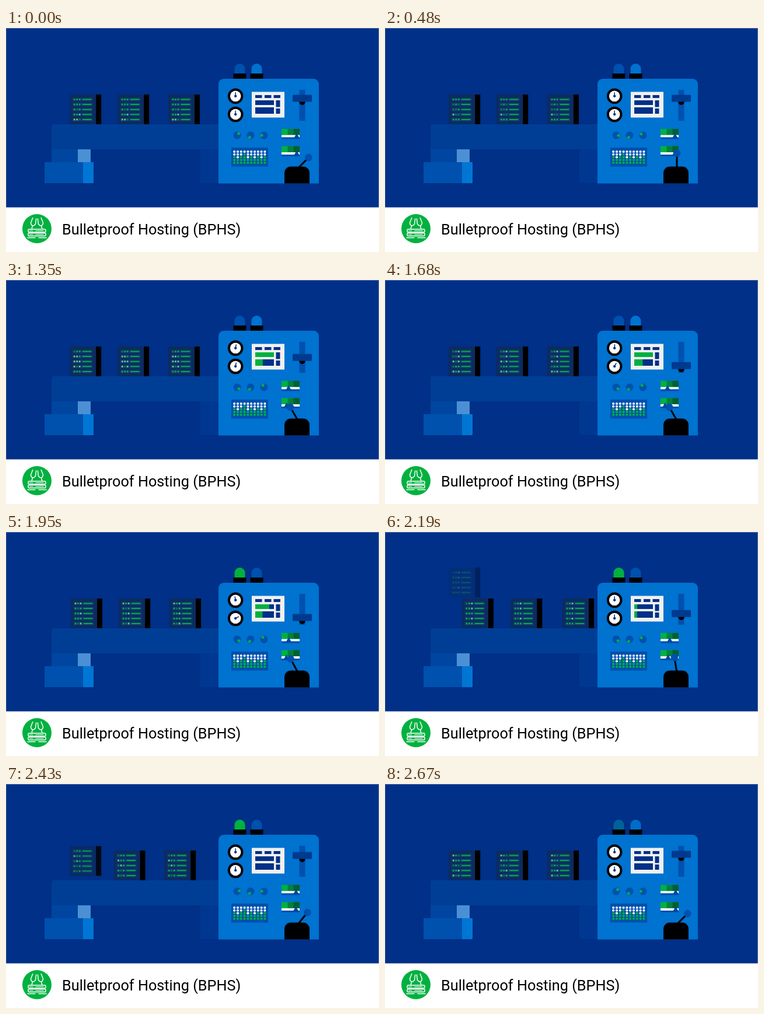
Recreate the animation shown at these times as an HTML page with a canvas. Size 639x384 px, loop 2700 ms.

```html
<!DOCTYPE html>
<html lang="en">
<head>
<meta charset="utf-8">
<title>Bulletproof Hosting (BPHS)</title>
<style>
html, body { margin: 0; width: 100%; height: 100%; overflow: hidden; background: #fff; }
canvas { display: block; width: 639px; height: 384px; }
</style>
</head>
<body>
<canvas id="stage" width="639" height="384"></canvas>
<script>
const ctx = document.getElementById('stage').getContext('2d');
const LOOP = 2700;
const NAVY = '#003087', MID = '#0050ae', BLUE = '#0072d0', GREEN = '#00b140';
const TITLE = 'Bulletproof Hosting (BPHS)';

const clamp = v => Math.max(0, Math.min(1, v));
const mix = (a, b, p) => a + (b - a) * p;
const smooth = (t, from, to) => {
  const u = clamp((t - from) / (to - from));
  return u * u * (3 - 2 * u);
};

// Steep ease in and out: cubic-bezier(.775, 0, .25, 1)
function glide(t, from, to) {
  const x = clamp((t - from) / (to - from));
  let lo = 0, hi = 1;
  for (let i = 0; i < 20; i++) {
    const s = (lo + hi) / 2, r = 1 - s;
    if (2.325 * s * r * r + 0.75 * s * s * r + s * s * s < x) lo = s; else hi = s;
  }
  return lo * lo * (3 - 2 * lo);
}

function mixColor(a, b, p) {
  return `rgb(${a.map((v, i) => Math.round(mix(v, b[i], p))).join()})`;
}

function rect(x, y, w, h, color, radius = 0) {
  ctx.fillStyle = color;
  ctx.beginPath();
  ctx.roundRect(x, y, w, h, radius);
  ctx.fill();
}

function disc(x, y, r, color) {
  ctx.fillStyle = color;
  ctx.beginPath();
  ctx.arc(x, y, r, 0, Math.PI * 2);
  ctx.fill();
}

function line(points, color, width) {
  ctx.strokeStyle = color;
  ctx.lineWidth = width;
  ctx.lineCap = ctx.lineJoin = 'round';
  ctx.beginPath();
  points.forEach(([x, y]) => ctx.lineTo(x, y));
  ctx.stroke();
}

function server(x, y, t, alpha = 1) {
  const tick = Math.floor(t / 150);
  ctx.save();
  ctx.globalAlpha = alpha;
  ctx.translate(x, y);
  rect(0, 0, 45, 51, '#0c2b60');
  rect(45, 0, 9, 51, '#000');
  for (let row = 0; row < 5; row++) {
    const cy = 8.5 + row * 8.6;
    rect(4.5, cy - 3, 35, 6, '#10386f');
    for (let dot = 0; dot < 3; dot++) {
      const noise = Math.sin((row * 3 + dot + 1) * 12.9 + tick * 4.7) * 437.5;
      const level = noise - Math.floor(noise);
      disc(8 + dot * 4.5, cy, 1.6, level < 0.25 ? '#0b7850' : level > 0.8 ? '#62c98a' : GREEN);
    }
    rect(21.5, cy - 1, 16, 2, GREEN, 1);
  }
  ctx.restore();
}

function conveyor(t, back) {
  rect(333, 207, 32, 59, '#003791');
  rect(78, 165, 287, 43, '#003e96', [4, 0, 0, 0]);
  rect(78, 208, 45, 22, '#00459f');
  rect(123, 208, 22, 22, '#4b90d4');
  rect(66, 230, 66, 36, MID);
  rect(132, 230, 18, 36, '#0076d4');

  [[109.2, 82], [191.2, 87], [278, 94]].forEach(([x, travel]) => server(x + travel * back, 114, t));
  if (t > 2048) server(109.2, mix(47, 114, smooth(t, 2048, 2531)), t, clamp((t - 2048) / 460));
}

function lamp(x, color) {
  rect(x - 9, 61, 18, 20, color, [9, 9, 0, 0]);
  rect(x - 11, 78, 22, 9, '#000');
}

function gauge(y, degrees) {
  disc(393.2, y, 13.3, '#000');
  disc(393.2, y, 9.3, '#fff');
  const a = degrees * Math.PI / 180;
  line([[393.2, y], [393.2 + 6 * Math.sin(a), y - 6 * Math.cos(a)]], NAVY, 1.5);
  disc(393.2, y, 2.2, NAVY);
}

function screen(t) {
  rect(421, 109.5, 56, 44, '#f0f0ef');
  [427, 443, 458.5].forEach(x => rect(x, 115, 11.5, 5, NAVY));
  rect(427, 124, 32, 8, NAVY);
  rect(427, 136, 32, 11, NAVY);
  rect(462.5, 124, 7, 11.5, NAVY);
  rect(462.5, 138, 7, 9, NAVY);
  const upper = smooth(t, 444, 1014) * (1 - smooth(t, 1763, 2336));
  const lower = 0.45 * smooth(t, 950, 1450) * (1 - smooth(t, 1800, 2430));
  rect(427, 124, 32 * upper, 8, GREEN);
  rect(427, 136, 32 * lower, 11, GREEN);
}

function slider(t, back) {
  const y = mix(120.5, 147, glide(t, 900, 1800) - back);
  rect(502.5, 106, 10, 53, MID);
  disc(507.5, y + 6, 5.3, '#000');
  rect(491, y - 6, 33, 12, '#003a8f', 1.5);
}

function knob(x, degrees) {
  const a = degrees * Math.PI / 180;
  disc(x, 184, 6.5, MID);
  disc(x + 3.9 * Math.cos(a), 184 + 3.9 * Math.sin(a), 2.5, GREEN);
}

function meter(y, x) {
  rect(472, y, 31, 10.5, GREEN);
  rect(482.5, y, 20.5, 10.5, '#00813c');
  rect(492.5, y, 10.5, 10.5, '#006130');
  rect(472, y + 10.5, 31, 4, '#fff');
  rect(472, y + 14.5, 31, 3, MID);
  ctx.save();
  ctx.beginPath();
  ctx.rect(472, y, 31, 17.5);
  ctx.clip();
  ctx.fillStyle = '#00479f';
  ctx.beginPath();
  ctx.moveTo(x, y + 7.5);
  ctx.lineTo(x + 5, y + 16);
  ctx.lineTo(x - 5, y + 16);
  ctx.fill();
  ctx.restore();
}

function dotPanel() {
  rect(386, 205, 63, 32.5, MID);
  [2, 3, 2, 1, 3, 2, 3, 2, 3, 2].forEach((white, col) => {
    for (let row = 0; row < 5; row++) {
      disc(391.2 + col * 5.8, 212 + row * 4.75, 2.1, row < white ? '#fff' : GREEN);
    }
  });
}

function lever(pull) {
  const a = mix(45, -30, pull) * Math.PI / 180;
  const x = 500 + 26 * Math.sin(a), y = 240.5 - 26 * Math.cos(a);
  line([[500, 240.5], [x, y]], '#000', 3);
  disc(x, y, 6.3, MID);
  rect(477, 237.5, 43, 29, '#000', [11, 11, 0, 0]);
}

function machine(t, back) {
  const pull = glide(t, 0, 900) - back;
  const alarm = smooth(t, 1770, 1880) * (1 - smooth(t, 2590, 2700));
  lamp(400.5, mixColor([0, 80, 174], [0, 177, 64], alarm));
  lamp(429.5, mixColor([0, 114, 208], [0, 80, 174], alarm));
  rect(364, 87, 172, 179.5, BLUE, [9, 9, 0, 0]);

  const settle = smooth(t, 1950, 2190);
  const nudge = smooth(t, 850, 1350), swing = smooth(t, 1500, 1950);
  gauge(116.8, (10 * nudge - 20 * swing) * (1 - settle));
  gauge(148, (10 * nudge + 52 * swing) * (1 - settle));
  screen(t);
  slider(t, back);

  knob(396, mix(-50, 40, glide(t, 0, 900) - smooth(t, 2150, 2670)));
  knob(419, 115);
  knob(442, mix(180, 242, pull));
  meter(173, mix(498, 484, smooth(t, 300, 1350) - back));
  meter(202.5, mix(498, 480, smooth(t, 300, 1500) - back));
  dotPanel();
  lever(pull);
}

function glass(x, tilt) {
  ctx.save();
  ctx.translate(x, 335);
  ctx.rotate(tilt);
  line([[-3, -9], [-4.2, 0], [-2.5, 3], [0, 4], [2.5, 3], [4.2, 0], [3, -9]], '#fff', 1.5);
  line([[0, 4], [0, 9]], '#fff', 1.5);
  ctx.restore();
}

function caption() {
  rect(0, 307.5, 639, 77, '#fff');
  disc(53, 344, 25, GREEN);
  glass(46.5, 0.25);
  glass(59.5, -0.25);
  [345, 351.5].forEach(y => {
    ctx.strokeStyle = '#fff';
    ctx.lineWidth = 1.5;
    ctx.beginPath();
    ctx.roundRect(38, y, 30, 5, 1.5);
    ctx.stroke();
    [41.5, 44.5].forEach(x => disc(x, y + 2.5, 0.9, '#fff'));
    line([[51, y + 2.5], [64, y + 2.5]], '#fff', 1.2);
  });
  line([[37, 359.5], [50, 359.5]], '#fff', 1.5);
  line([[56, 359.5], [69, 359.5]], '#fff', 1.5);

  setFont();
  ctx.fillStyle = '#000';
  ctx.fillText(TITLE, 96, 354);
}

function setFont() {
  ctx.fontStretch = 'condensed';
  ctx.font = `${titleSize}px Roboto, Lato, sans-serif`;
}

// Largest title size that keeps the line within its space
let titleSize = 30;
do setFont(); while (ctx.measureText(TITLE).width > 307.5 && (titleSize -= 0.25) > 18);

function draw(now) {
  const t = now % LOOP;
  const back = glide(t, 1790, 2690);
  rect(0, 0, 639, 384, NAVY);
  conveyor(t, back);
  machine(t, back);
  ctx.strokeStyle = 'rgba(255, 255, 255, 0.35)';
  ctx.lineWidth = 1;
  ctx.strokeRect(0.5, 0.5, 638, 308);
  caption();
}

let start;
function frame(now) {
  start ??= now;
  draw(now - start);
  requestAnimationFrame(frame);
}
draw(0);
requestAnimationFrame(frame);
</script>
</body>
</html>
```
